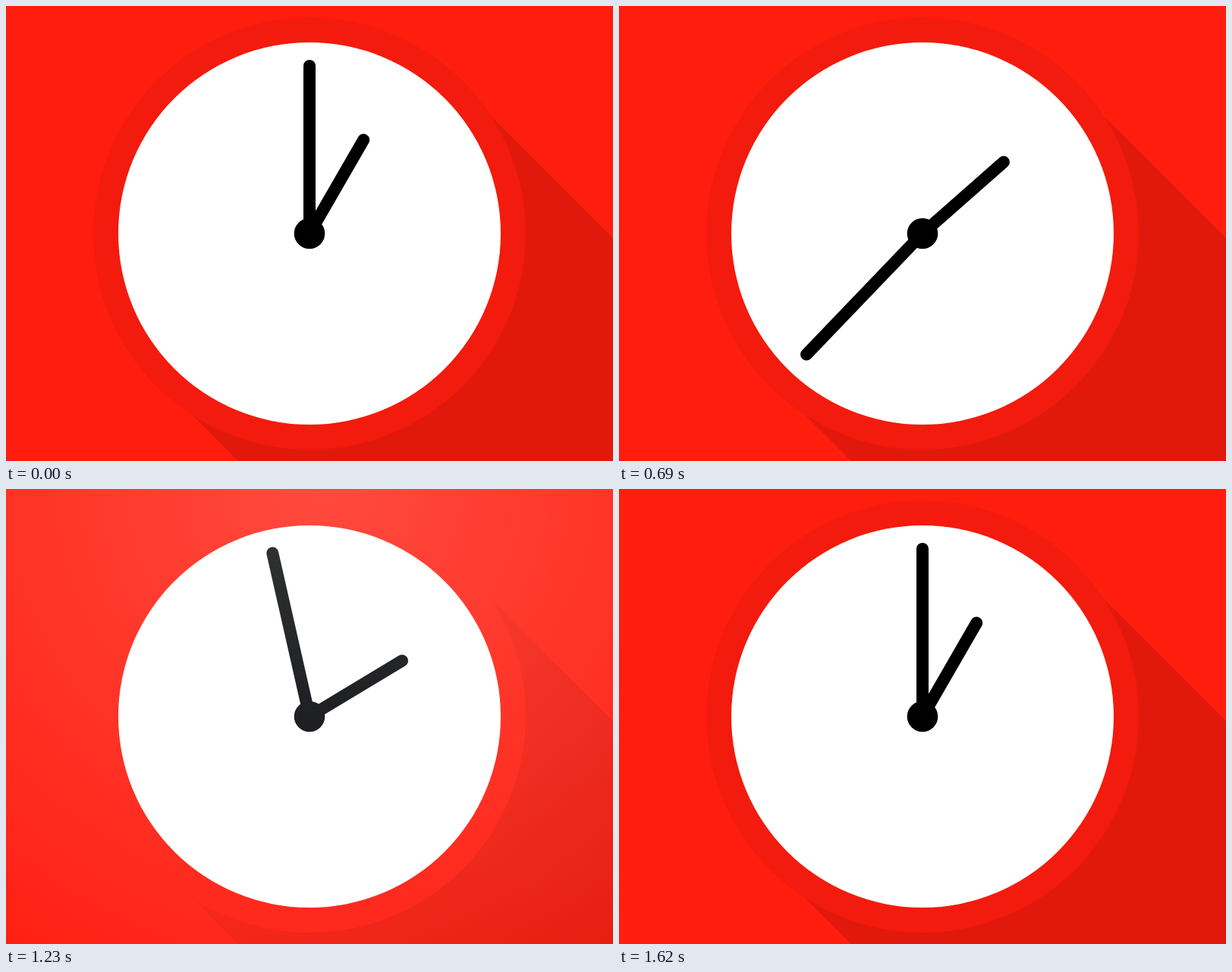
An HTML page with a canvas that plays this animation: 800x600 px, repeating every 1.8 s.

```html
<!DOCTYPE html>
<html lang="en">
<head>
<meta charset="utf-8">
<title>Clock</title>
<style>
  html, body { margin: 0; height: 100%; overflow: hidden; }
  canvas { display: block; }
</style>
</head>
<body>
<canvas id="stage" width="800" height="600"></canvas>
<script>
const ctx = document.getElementById('stage').getContext('2d');
const LOOP = 1800, STEP = 30;
const FORWARD = 37, REWIND = 38, END = 54;
const CX = 400, CY = 300;

function withStops(gradient, stops) {
  for (const [at, color] of stops) gradient.addColorStop(at, color);
  return gradient;
}

const flat = { back: '#ff1d0d', shadow: '#e1190d', ring: '#f31b0d', hands: '#000' };
const glowBack = withStops(ctx.createRadialGradient(420, 0, 0, 420, 0, 730),
  [[0, '#ff4a3e'], [0.55, '#ff3327'], [1, '#ff2013']]);
const glow = {
  back: glowBack,
  shadow: withStops(ctx.createLinearGradient(450, 350, 750, 650),
    [[0, 'rgba(0,0,0,.03)'], [1, 'rgba(0,0,0,.1)']]),
  ring: glowBack,
  hands: withStops(ctx.createLinearGradient(0, 70, 0, 520),
    [[0, '#303131'], [0.53, '#1d1f22'], [1, '#181a1c']])
};

function disc(radius, fill) {
  ctx.fillStyle = fill;
  ctx.beginPath();
  ctx.arc(CX, CY, radius, 0, Math.PI * 2);
  ctx.fill();
}

function longShadow(fill) {
  const d = 197, far = 600;
  ctx.fillStyle = fill;
  ctx.beginPath();
  ctx.moveTo(CX + d, CY - d);
  ctx.lineTo(CX + d + far, CY - d + far);
  ctx.lineTo(CX - d + far, CY + d + far);
  ctx.lineTo(CX - d, CY + d);
  ctx.fill();
}

function hand(turn, length, stroke) {
  const a = turn * Math.PI * 2;
  ctx.strokeStyle = stroke;
  ctx.lineWidth = 16;
  ctx.lineCap = 'round';
  ctx.beginPath();
  ctx.moveTo(CX, CY);
  ctx.lineTo(CX + length * Math.sin(a), CY - length * Math.cos(a));
  ctx.stroke();
}

function easeInOut(u) {
  const p = 2.7;
  return u < 0.5 ? (2 * u) ** p / 2 : 1 - (2 - 2 * u) ** p / 2;
}

// Hours elapsed since one o'clock: steady forward, then an eased rewind.
function elapsed(step) {
  if (step < REWIND) return Math.min(1, step / FORWARD);
  return 1 - easeInOut(Math.min(1, (step - REWIND) / (END - REWIND)));
}

function draw(step) {
  const look = step >= REWIND && step < END ? glow : flat;
  const hours = elapsed(step);
  ctx.fillStyle = look.back;
  ctx.fillRect(0, 0, 800, 600);
  longShadow(look.shadow);
  disc(285, look.ring);
  disc(252, '#fff');
  hand((1 + hours) / 12, 142.5, look.hands);
  hand(hours, 221, look.hands);
  disc(20.3, look.hands);
}

const start = performance.now();
function tick() {
  draw(Math.floor((performance.now() - start) % LOOP / STEP));
  requestAnimationFrame(tick);
}
tick();
</script>
</body>
</html>
```
